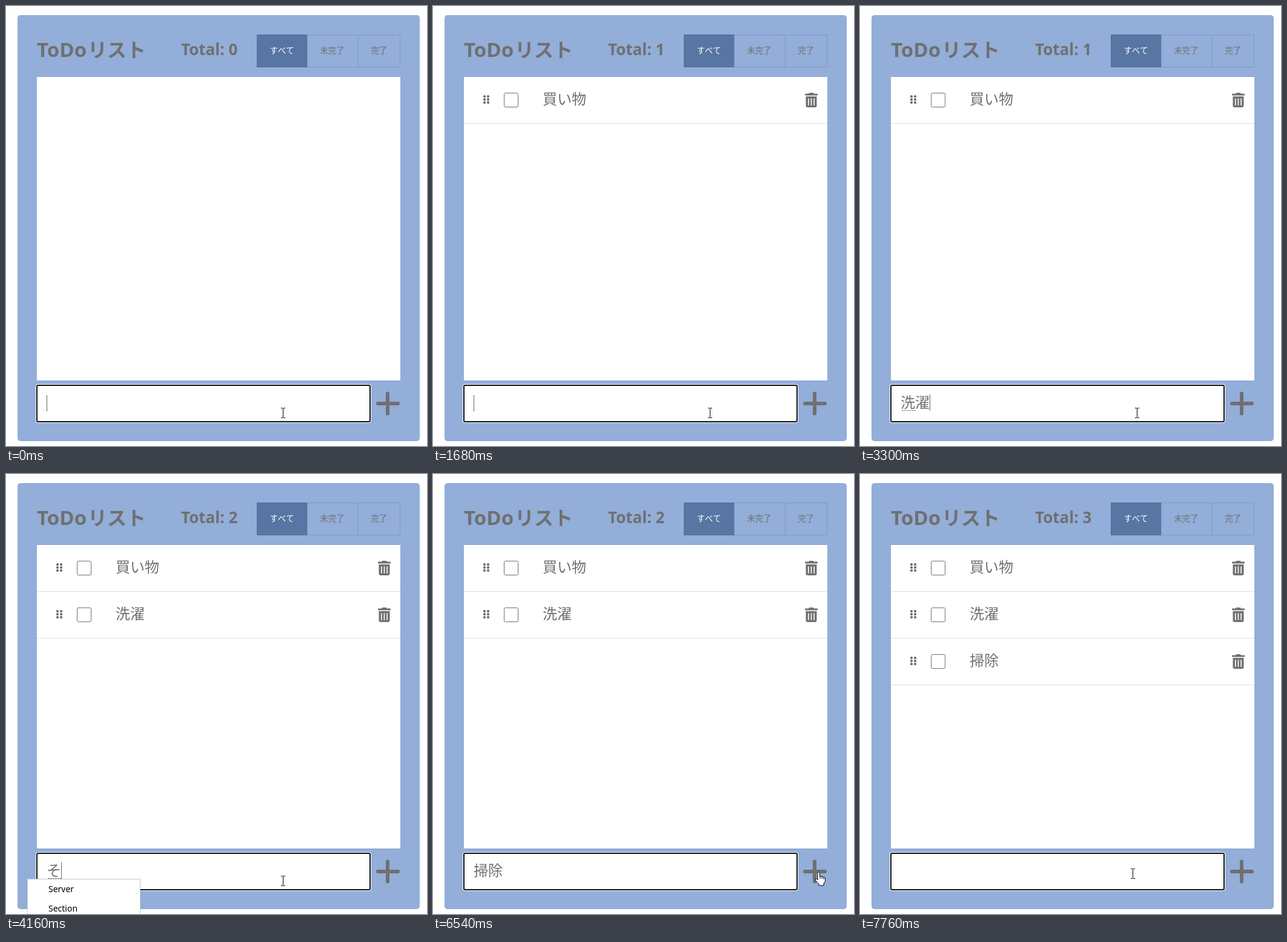
An HTML page with a canvas for the animation above (8000 ms loop, 695 by 725 pixels).

```html
<!DOCTYPE html>
<html lang="ja">
<head>
<meta charset="utf-8">
<title>ToDoリスト</title>
<style>
html, body { margin: 0; width: 100%; height: 100%; overflow: hidden; background: #fff; }
canvas { display: block; }
</style>
</head>
<body>
<canvas id="stage" width="695" height="725"></canvas>
<script>
const ctx = document.getElementById('stage').getContext('2d');
const LOOP = 8000, GRAY = '#707070', BLUE = '#92aed9';
const JP = '"Noto Sans CJK JP", "Noto Sans CJK", sans-serif';
const LATIN = '"Noto Sans", "Open Sans", sans-serif';

const tasks = [[1680, '買い物'], [3500, '洗濯'], [6740, '掃除']];
const latinWords = ['Server', 'Section'];

// Input states: start time, text, underline style, suggestions, popup width
const typing = [
  [0, ''],
  [200, 'か', 'dash', ['から', 'かな']],
  [270, 'か', 'dash', ['確認', '開始']],
  [340, 'かい', 'dash', ['確認', '開始']],
  [410, 'かい', 'dash', ['会議', '開始']],
  [600, 'かいｍ', 'dash', ['会議', '開始']],
  [670, 'かいも', 'dash', ['会議', '開始']],
  [740, 'かいも', 'dash', ['買い物', '買い物は']],
  [880, 'かいもｎ', 'dash', ['買い物', '買い物は']],
  [950, 'かいもの', 'dash', ['買い物', '買い物は']],
  [1090, '買い物', 'solid'],
  [1480, '買い物'],
  [1680, ''],
  [2210, 'せ', 'dash', latinWords],
  [2280, 'せ', 'dash', ['設定', '選択']],
  [2440, 'せｎ', 'dash', ['設定', '選択']],
  [2510, 'せん', 'dash', ['選択', '専用']],
  [2760, 'せんｔ', 'dash', ['選択', '専用']],
  [2830, 'せんた', 'dash', ['選択', '洗濯']],
  [2910, 'せんたく', 'dash', ['洗濯', '選択']],
  [2980, '洗濯', 'solid'],
  [3300, '洗濯', 'short'],
  [3500, ''],
  [4160, 'そ', 'dash', latinWords],
  [4230, 'そ', 'dash', ['その', 'それ']],
  [4300, 'そう', 'dash', ['その', 'それ']],
  [4370, 'そう', 'dash', ['そうですね', '送信'], 237],
  [4440, 'そうｊ', 'dash', ['そうですね', '送信'], 237],
  [4510, 'そうじ', 'dash', ['掃除', '掃除機'], 237],
  [4640, '掃除', 'solid'],
  [4910, '掃除'],
  [6740, '']
];
const caretOff = [[2020, 2210], [3830, 4160], [5440, 5970], [6500, 7230], [7760, 8000]];
const within = (t, [from, to]) => t >= from && t < to;

function rect(x, y, w, h, color, radius = 0) {
  ctx.fillStyle = color;
  ctx.beginPath();
  ctx.roundRect(x, y, w, h, radius);
  ctx.fill();
}

function outline(x, y, w, h, color, radius = 0) {
  ctx.strokeStyle = color;
  ctx.lineWidth = 1;
  ctx.beginPath();
  ctx.roundRect(x + .5, y + .5, w - 1, h - 1, radius);
  ctx.stroke();
}

function text(str, x, y, size, color = GRAY, family = JP, weight = 400) {
  ctx.font = `${weight} ${size}px ${family}`;
  ctx.fillStyle = color;
  ctx.fillText(str, x, y);
}

function drawHeader(count) {
  text('ToDo', 51, 84, 33, GRAY, LATIN, 700);
  text('リスト', 135, 84, 32, GRAY, JP, 700);
  text('Total: ' + count, 289, 81, 26, GRAY, LATIN, 700);
  rect(414, 47, 84, 54, '#5776a3');
  outline(414, 47, 84, 54, '#4f6d98');
  outline(497, 47, 85, 54, '#7c98c4');
  outline(581, 47, 70, 54, '#7c98c4');
  text('すべて', 435.5, 78, 13.33, '#fff');
  text('未完了', 518.5, 78, 13.33);
  text('完了', 602.5, 78, 13.33);
}

function drawTrash(x, y) {
  rect(x, y + 1.5, 21, 3, GRAY, 1);
  rect(x + 6.5, y, 8, 3, GRAY, 1);
  rect(x + 1.5, y + 6, 18, 18, GRAY, [0, 0, 3, 3]);
  for (let i = 0; i < 3; i++) rect(x + 5 + i * 4.7, y + 9, 1.6, 12, '#fff', .8);
}

function drawRow(name, index) {
  const y = 117 + index * 77;
  for (let i = 0; i < 6; i++) rect(83 + i % 2 * 6, y + 30 + (i >> 1) * 5, 4, 4, GRAY, 1.5);
  outline(117, y + 26, 24, 24, GRAY, 2);
  text(name, 181, y + 45, 24);
  drawTrash(614, y + 26);
  rect(51, y + 76, 600, 1, '#dedede');
}

function drawInput(t, [, value, underline]) {
  const focused = !within(t, [6670, 7230]);
  if (focused) {
    rect(49, 623, 554, 64, '#fff', 4);
    rect(50, 624, 552, 62, '#101010', 3);
  }
  rect(focused ? 52 : 51, 626, focused ? 548 : 550, 58, '#fff', 1);
  text(value, 67, 662, 24);
  const end = 67 + value.length * 24;
  if (underline === 'solid') rect(68, 665, end - 69, 2, GRAY);
  else if (underline) {
    const stop = underline === 'short' ? 90 : end - 1;
    for (let x = 69; x < stop; x += 4) rect(x, 666, 3, 1, GRAY);
  }
  if (!caretOff.some(span => within(t, span))) {
    rect(end, value ? 640 : 641, 1, 27, '#666');
  }
}

function drawPlus() {
  rect(611, 652, 39, 6, GRAY, 3);
  rect(627, 635.5, 6, 39, GRAY, 3);
}

function drawPopup(words, width = 187) {
  rect(35, 667, width, 60, '#fff');
  outline(35, 667, width, 60, '#c8c8c8');
  words.forEach((word, i) => text(word, 70, 689 + i * 32, 14, '#000', LATIN + ', ' + JP));
}

const hand = new Path2D('M-2 1Q-.5-1.5 1.5 1V7Q3 5.5 4.5 7.5Q6 6.5 7.5 8.5Q9.5 8 10.5 10V15L8 19V22H0V20L-6 13Q-6 10-3.5 11L-2 13Z');
const arrow = new Path2D('M0 0V16L4 12.5L6.5 18L9 17L6.5 11.5H11.5Z');

// Pointer moves in discrete jumps along an eased path
function progress(t, start, steps, interval) {
  const p = Math.max(0, Math.min(steps, Math.floor((t - start) / interval) + 1)) / steps;
  return p * p * (3 - 2 * p);
}

function drawPointer(t) {
  const go = progress(t, 5860, 10, 75.5), back = progress(t, 6810, 7, 70);
  const x = Math.round(457 + 180 * go - 187 * back);
  const y = Math.round(670 - 14 * go + 2 * back);
  ctx.save();
  ctx.translate(x, y);
  if (x < 602) {
    rect(0, -7, 1, 15, '#000');
    for (const side of [-8, 8]) {
      rect(-3, side, 3, 1, '#000');
      rect(1, side, 3, 1, '#000');
    }
  } else {
    const shape = x < 610 ? arrow : hand;
    ctx.fillStyle = '#fff';
    ctx.fill(shape);
    ctx.strokeStyle = '#000';
    ctx.lineWidth = 1;
    ctx.stroke(shape);
    if (shape === hand) {
      rect(1.5, 6, 1, 5, '#000');
      rect(4.5, 7, 1, 4, '#000');
      rect(7.5, 8, 1, 4, '#000');
    }
  }
  ctx.restore();
}

function draw(t) {
  const visible = tasks.filter(([start]) => t >= start);
  const state = typing.findLast(([start]) => t >= start);
  rect(0, 0, 695, 725, '#fff');
  rect(19, 15, 664, 702, BLUE, 5);
  drawHeader(visible.length);
  rect(51, 117, 600, 500, '#fff');
  visible.forEach(([, name], i) => drawRow(name, i));
  drawInput(t, state);
  drawPlus();
  if (state[3]) drawPopup(state[3], state[4]);
  drawPointer(t);
}

const begin = performance.now();
function tick() {
  draw((performance.now() - begin) % LOOP);
  requestAnimationFrame(tick);
}
tick();
</script>
</body>
</html>
```
